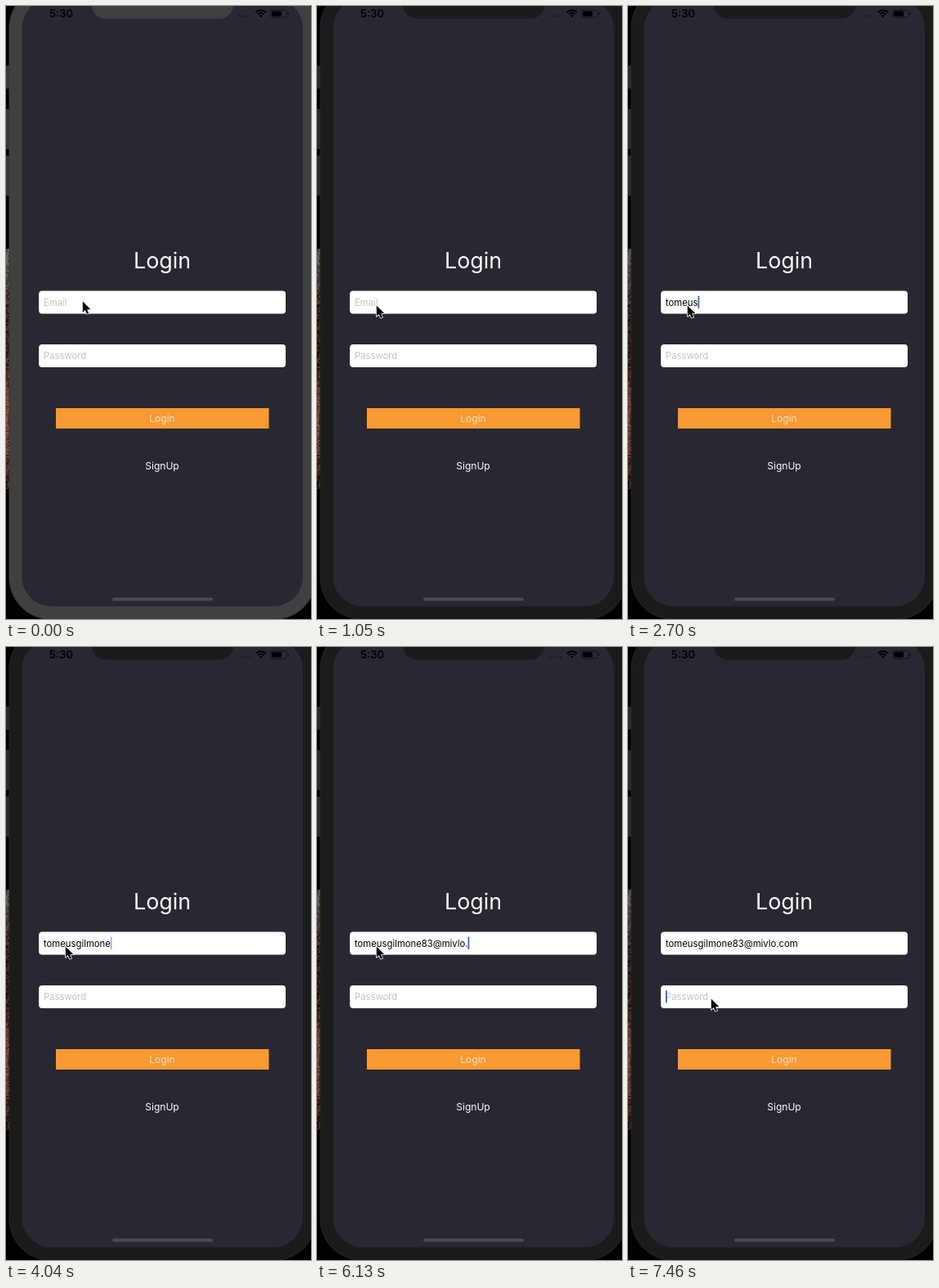
Animation, 373 px wide and 750 px high, one loop 8000 ms. Source, as an HTML page with a canvas:

```html
<!DOCTYPE html>
<html lang="en">
<head>
<meta charset="utf-8">
<title>Login</title>
<style>
  html, body { margin: 0; width: 100%; height: 100%; overflow: hidden; background: #000; }
  canvas { display: block; width: 373px; height: 750px; }
</style>
</head>
<body>
<canvas id="stage"></canvas>
<script>
const W = 373, H = 750, LOOP = 8000;
const canvas = document.getElementById('stage');
const ctx = canvas.getContext('2d');
const ratio = window.devicePixelRatio || 1;
canvas.width = W * ratio;
canvas.height = H * ratio;

const EMAIL = 'tomeusgilmone83@mivlo.com';
const EMAIL_TAP = 900, PASSWORD_TAP = 7460;

// Typing comes in bursts with pauses between them.
const bursts = [
  { start: 2100, end: 2100, from: 1, to: 1 },
  { start: 2400, end: 3440, from: 3, to: 13 },
  { start: 4190, end: 4930, from: 14, to: 16 },
  { start: 5230, end: 5680, from: 17, to: 21 },
  { start: 6130, end: 6130, from: 22, to: 22 },
  { start: 6430, end: 6570, from: 24, to: 25 }
];

const clamp = v => Math.min(1, Math.max(0, v));
const mix = (a, b, u) => a + (b - a) * u;
const ease = u => u * u * (3 - 2 * u);
const progress = (t, start, end) => end > start ? clamp((t - start) / (end - start)) : 1;

function typing(t) {
  const b = bursts.findLast(b => b.start <= t);
  if (!b) return { count: 0, lastKey: 400 };
  const count = mix(b.from, b.to, progress(t, b.start, b.end));
  return { count: Math.min(b.to, Math.floor(count + 0.2)), lastKey: Math.min(t, b.end) };
}

// The caret is lit for 600 ms of every 900 ms, counted from the last key.
const blink = idle => clamp((650 - idle % 900) / 100);

function pointerAt(t) {
  const toEmail = ease(progress(t, 550, 900));
  const toPassword = ease(progress(t, 6950, 7310));
  return [
    mix(mix(93, 72, toEmail), 101, toPassword),
    mix(mix(361, 366, toEmail), 430, toPassword)
  ];
}

function box(x, y, w, h, r, color) {
  ctx.fillStyle = color;
  ctx.beginPath();
  ctx.roundRect(x, y, w, h, r);
  ctx.fill();
}

function label(str, x, y, size, color, align = 'left', weight = 400) {
  ctx.font = `${weight} ${size}px Inter, sans-serif`;
  ctx.textAlign = align;
  ctx.fillStyle = color;
  ctx.fillText(str, x, y);
}

// Grainy strip: grey at the top, then dark, then rust.
function drawWallpaper(lit) {
  let seed = 7;
  const random = () => (seed = seed * 16807 % 2147483647) / 2147483647;
  for (let y = 297; y < 590; y += 2) {
    const depth = (y - 297) / 293;
    const base = 14 + 10 * Math.cos(depth * 9);
    for (let x = 0; x < 5; x += 2) {
      const light = base + random() * 22 - (lit ? 0 : 3);
      ctx.fillStyle = `hsl(9, ${clamp(depth * 2) * 40}%, ${light}%)`;
      ctx.fillRect(x, y, 2, 2);
    }
  }
}

function drawPhone(lit) {
  const bezel = lit ? '#404040' : '#1b1b1b';
  const key = lit ? '#383838' : '#2c2c2c';
  for (const [y, h] of [[73, 28], [126, 49], [183, 49]]) box(-3, y, 8, h, 1, key);
  box(3.5, -25, 376, 776, 52, lit ? '#383838' : '#252525');
  box(4.5, -24, 374, 774, 51, bezel);
  box(19.5, -9, 343.5, 743.5, 36, '#292731');
  box(105, -20, 173, 35.5, 17, bezel);
}

function drawStatus() {
  label('5:30', 67.5, 14, 13, '#000', 'center', 600);
  for (let i = 0; i < 4; i++) box(284.5 + i * 4.2, 11.5, 2.6, 2, 0.6, '#1d1b23');

  // wifi
  const arc = r => ctx.arc(311.7, 13.6, r, -Math.PI * 0.76, -Math.PI * 0.24);
  ctx.strokeStyle = ctx.fillStyle = '#000';
  ctx.lineWidth = 2;
  for (const r of [8.3, 5]) {
    ctx.beginPath();
    arc(r);
    ctx.stroke();
  }
  ctx.beginPath();
  ctx.moveTo(311.7, 14);
  arc(2.8);
  ctx.fill();

  // battery
  ctx.strokeStyle = '#15131a';
  ctx.lineWidth = 1;
  ctx.beginPath();
  ctx.roundRect(323.5, 4.8, 20, 9.2, 2.6);
  ctx.stroke();
  box(325, 6.3, 12, 6.2, 1.3, '#000');
  box(344.7, 7.8, 1.3, 3.2, 0.6, '#15131a');
}

function drawField(y, text, placeholder, caret) {
  box(40.2, y, 301.8, 28, 4, '#fff');
  label(text || placeholder, 46, y + 18, 11.3, text ? '#000' : '#c4c4c7');
  const x = 46 + (text ? ctx.measureText(text).width : 0);
  ctx.globalAlpha = caret;
  box(x, y + 6, 1.8, 15.5, 0.8, '#3d63e6');
  ctx.globalAlpha = 1;
}

function drawPointer(x, y) {
  const arrow = new Path2D('M0 0V15.5L3.5 12.3L5.9 17.6L8.5 16.5L6.2 11.3L11 11.1Z');
  ctx.save();
  ctx.translate(x + 0.8, y + 0.5);
  ctx.scale(0.86, 0.86);
  ctx.lineJoin = 'round';
  ctx.lineWidth = 1.8;
  ctx.strokeStyle = '#fff';
  ctx.stroke(arrow);
  ctx.fillStyle = '#000';
  ctx.fill(arrow);
  ctx.restore();
}

function draw(t) {
  const lit = t < 150;
  const { count, lastKey } = typing(t);
  const emailFocus = t >= EMAIL_TAP && t < PASSWORD_TAP;
  const passwordFocus = t >= PASSWORD_TAP;

  ctx.setTransform(ratio, 0, 0, ratio, 0, 0);
  ctx.fillStyle = '#000';
  ctx.fillRect(0, 0, W, H);
  drawWallpaper(lit);
  drawPhone(lit);
  drawStatus();

  label('Login', 191, 320.5, 26.8, '#fff', 'center');
  drawField(348.5, EMAIL.slice(0, count), 'Email', emailFocus ? blink(t - lastKey) : 0);
  drawField(414, '', 'Password', passwordFocus ? blink(t - PASSWORD_TAP) : 0);
  box(61, 492, 260.5, 25, 0, '#f89932');
  label('Login', 191, 509, 12, '#fde3c6', 'center');
  label('SignUp', 191, 567, 12, '#fff', 'center');
  box(130, 723.7, 123, 4, 2, '#4b4a4e');

  drawPointer(...pointerAt(t));
}

let start;
function tick(now) {
  start ??= now;
  draw((now - start) % LOOP);
  requestAnimationFrame(tick);
}
draw(0);
requestAnimationFrame(tick);
</script>
</body>
</html>
```
